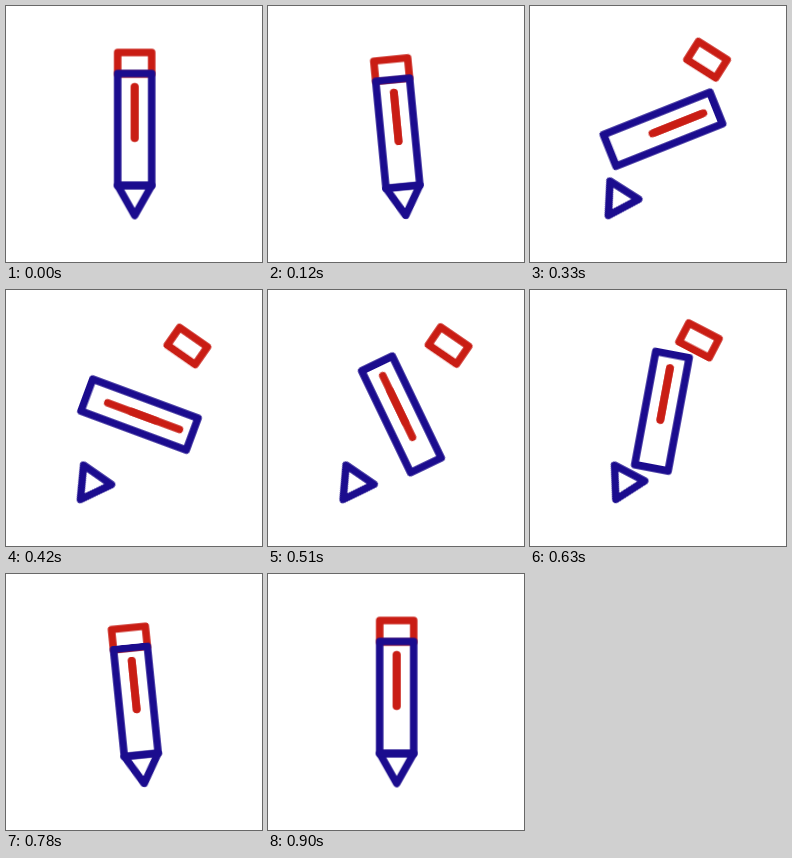
Write an HTML page without scripts that moves like this. It is 256x256 px and loops after 960 ms.

```html
<!DOCTYPE html>
<html lang="en">
<head>
<meta charset="utf-8">
<title>Pencil</title>
<style>
  html, body { margin: 0; width: 100%; height: 100%; overflow: hidden; background: #fff; }
  svg { display: block; width: 100%; height: 100%; }

  .blue, .red { fill: none; stroke-width: 7.5; stroke-linecap: round; stroke-linejoin: round; }
  .blue { stroke: #1b0c8e; }
  .red { stroke: #c91d14; }

  .pencil, .slide, .turn, .stretch, .lead, .trail { animation: 960ms linear infinite; }
  .pencil { animation-name: lean; }
  .slide { animation-name: spread; }
  .body { --gap: -17.5px; }
  .eraser { --gap: -35px; }
  .turn { animation-name: turn; }
  .stretch { animation-name: stretch; animation-timing-function: ease-in-out; }
  .lead { animation-name: lead; }
  .trail { animation-name: trail; }

  /* The tip stays on the ground line: wind up, swing open, swing back */
  @keyframes lean {
    0% { transform: translateX(0) rotate(0deg) scaleY(1); animation-timing-function: cubic-bezier(.333, 0, .667, 1); }
    12.5% { transform: translateX(9.5px) rotate(-5.8deg) scaleY(.96); animation-timing-function: cubic-bezier(.22, .54, .36, 1); }
    46.875% { transform: translateX(-54.5px) rotate(35deg) scaleY(1); animation-timing-function: cubic-bezier(.64, 0, .78, .46); }
    81.25% { transform: translateX(9.5px) rotate(-5.8deg) scaleY(.96); animation-timing-function: cubic-bezier(.333, 0, .667, 1); }
    93.75%, 100% { transform: translateX(0) rotate(0deg) scaleY(1); }
  }
  @keyframes spread {
    0%, 12.5% { transform: translateY(0); animation-timing-function: cubic-bezier(.22, .54, .36, 1); }
    46.875% { transform: translateY(var(--gap)); animation-timing-function: cubic-bezier(.64, 0, .78, .46); }
    81.25%, 100% { transform: translateY(0); }
  }
  @keyframes turn {
    0%, 12.5% { transform: rotate(0deg); animation-timing-function: cubic-bezier(.46, 0, .54, 1); }
    81.25%, 100% { transform: rotate(180deg); }
  }
  @keyframes stretch {
    0%, 12.5%, 46.875%, 81.25%, 100% { transform: scaleY(1); }
    27%, 66.75% { transform: scaleY(1.035); }
  }
  /* Two overlapping strokes: one stretches the line, the other draws it in */
  @keyframes lead {
    0%, 31.25% { transform: translateY(0); animation-timing-function: cubic-bezier(.333, 0, .667, 1); }
    50%, 100% { transform: translateY(34px); }
  }
  @keyframes trail {
    0%, 43.75% { transform: translateY(0); animation-timing-function: cubic-bezier(.333, 0, .667, 1); }
    62.5%, 100% { transform: translateY(34px); }
  }
</style>
</head>
<body>
<svg viewBox="0 0 256 256">
  <g transform="translate(128.7 209.5)">
    <g class="pencil">
      <g class="slide eraser">
        <rect class="red" x="-17" y="-163" width="34" height="21.5"/>
      </g>
      <path class="blue" d="M-17-30H17L0 0Z"/>
      <g class="slide body">
        <g transform="translate(0 -86)">
          <g class="turn">
            <g class="stretch">
              <rect class="blue" x="-17" y="-56" width="34" height="112"/>
              <path class="red lead" d="M0-42.5V8.5"/>
              <path class="red trail" d="M0-42.5V8.5"/>
            </g>
          </g>
        </g>
      </g>
    </g>
  </g>
</svg>
</body>
</html>
```
